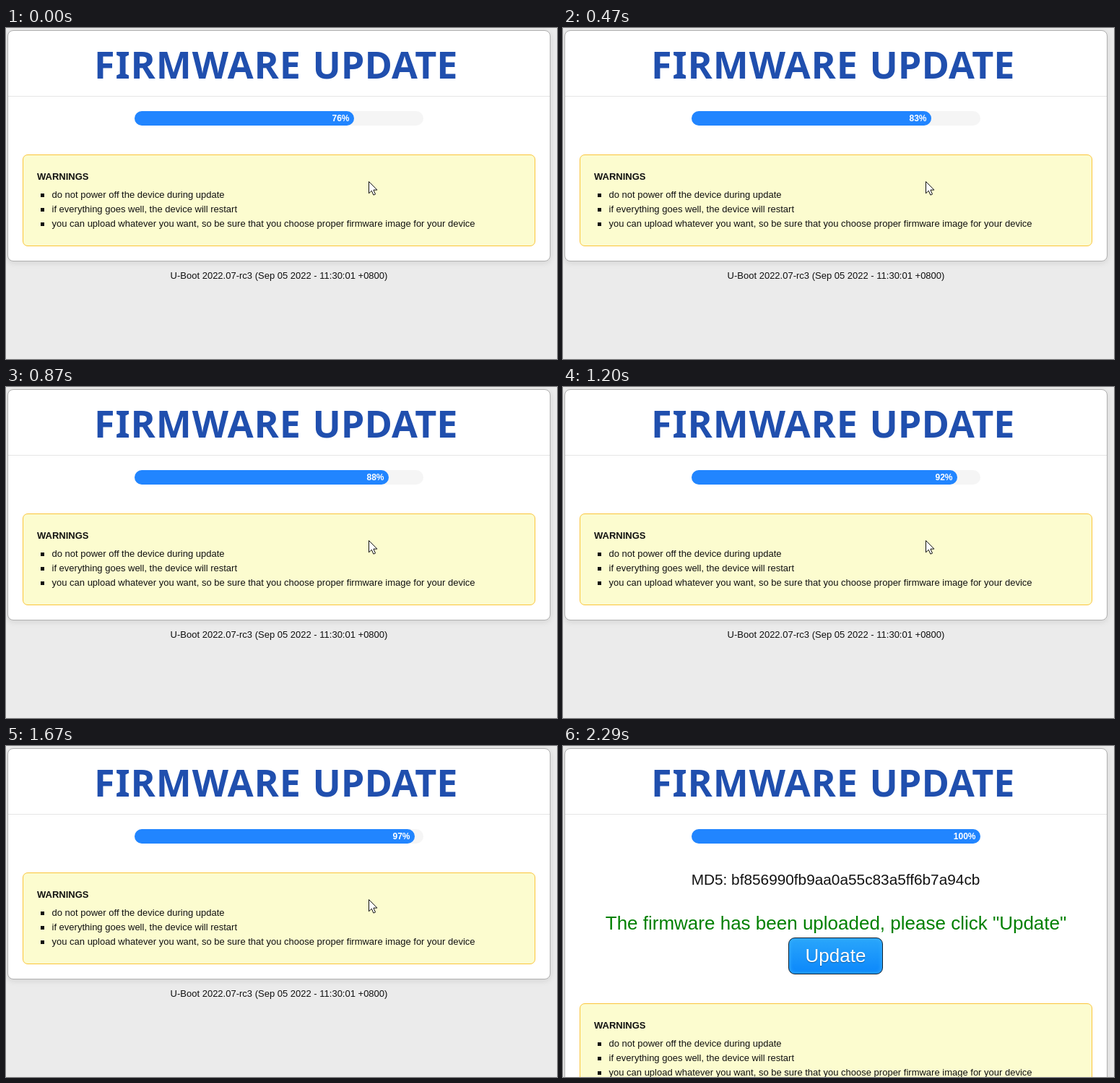
Animation of 763 by 458 pixels, one loop 4670 ms. Source, as an HTML page:

```html
<!DOCTYPE html>
<html lang="en">
<head>
<meta charset="utf-8">
<title>Firmware update</title>
<style>
  html, body { margin: 0; width: 100%; height: 100%; overflow: hidden; background: #ebebeb; }
  div, svg { position: absolute; box-sizing: border-box; }
  body { --shift: 0px; }
  .shifted { transform: translateY(var(--shift)); }
  .done { visibility: hidden; }
  .uploaded .done { visibility: visible; }
  .uploaded #cursor { visibility: hidden; }
  .uploaded { --shift: 181px; }

  #card {
    left: 2px; top: 3px; width: 752px; height: calc(320px + var(--shift));
    background: #fff; border: 1px solid #b0b0b0; border-radius: 8px;
    box-shadow: 0 2px 9px rgba(0, 0, 0, .1);
  }
  #rule { left: 3px; top: 94px; width: 750px; height: 1px; background: #e5e5e5; }
  #track, #bar { left: 178px; top: 115px; width: 400px; height: 20px; border-radius: 10px; background: #f5f5f5; }
  #bar { background: #2185ff; }
  #warnings {
    left: 23px; top: 175px; width: 710px; height: 127px;
    background: #fcfccf; border: 1px solid #fbc53a; border-radius: 7px;
  }
  #button {
    left: 312px; top: 265px; width: 131px; height: 51px;
    border: 1px solid #10202e; border-radius: 9px;
    background: linear-gradient(#2aa6fb, #0b87fb);
    box-shadow: inset 0 0 5px 1px #35adff;
  }

  svg { left: 0; top: 0; width: 763px; height: 458px; overflow: hidden; }
  text { font: 13px "Liberation Sans", Arial, sans-serif; fill: #111; }
  .title { font: bold 52px "Noto Sans", sans-serif; fill: #204fae; }
  .center { text-anchor: middle; }
  .bold { font-weight: bold; }
  #percent { font-size: 12px; font-weight: bold; fill: #fff; text-anchor: end; }
  .hash { font-size: 20.8px; }
  .notice { font-size: 26px; fill: #008000; }
  .label { font-size: 26px; fill: #fff; text-shadow: 0 1px 1px rgba(0, 0, 0, .35); }
</style>
</head>
<body>
<div id="card"></div>
<div id="rule"></div>
<div id="track"></div>
<div id="bar"></div>
<div id="warnings" class="shifted"></div>
<div id="button" class="done"></div>

<svg viewBox="0 0 763 458">
  <text class="title" x="122" y="70" letter-spacing="0.9">FIRMWARE</text>
  <text class="title" x="424.5" y="70">UPDATE</text>
  <text id="percent" y="129"></text>

  <g class="done">
    <text class="hash center" x="377.5" y="192">MD5: bf856990fb9aa0a55c83a5ff6b7a94cb</text>
    <text class="notice center" x="378" y="254">The firmware has been uploaded, please click "Update"</text>
    <text class="label center" x="377.5" y="299">Update</text>
  </g>

  <g class="shifted">
    <text class="bold" x="43" y="210">WARNINGS</text>
    <text x="63.5" y="235">do not power off the device during update</text>
    <text x="63.5" y="255">if everything goes well, the device will restart</text>
    <text x="63.5" y="275">you can upload whatever you want, so be sure that you choose proper firmware image for your device</text>
    <path d="M48 229h5v5h-5zm0 20h5v5h-5zm0 20h5v5h-5z" fill="#111"/>
    <text class="center" x="378" y="347">U-Boot 2022.07-rc3 (Sep 05 2022 - 11:30:01 +0800)</text>
  </g>

  <path id="cursor" d="M502.5 212.5v16.3l3.8-3.6 2.6 5.9 2.6-1.1-2.6-5.9h5z" fill="#fff" stroke="#111"/>
</svg>

<script>
  const LOOP = 4670;
  const UPLOADED_AT = 2290;
  // [start in ms, percent]
  const steps = [
    [0, 76], [70, 77], [170, 78], [270, 80], [370, 81], [470, 83], [540, 84],
    [670, 86], [770, 87], [870, 88], [1000, 89], [1070, 90], [1200, 92],
    [1400, 94], [1480, 95], [1600, 97], [1700, 98], [1800, 99], [1870, 100]
  ];
  const bar = document.getElementById("bar");
  const percent = document.getElementById("percent");
  const start = performance.now();

  function draw(now) {
    const time = Math.max(0, now - start) % LOOP;
    const value = steps.findLast(([from]) => from <= time)[1];
    const width = value * 4;
    bar.style.width = width + "px";
    percent.setAttribute("x", 178 + width - 6.5);
    percent.textContent = value + "%";
    document.body.classList.toggle("uploaded", time >= UPLOADED_AT);
    requestAnimationFrame(draw);
  }
  draw(start);
</script>
</body>
</html>
```
